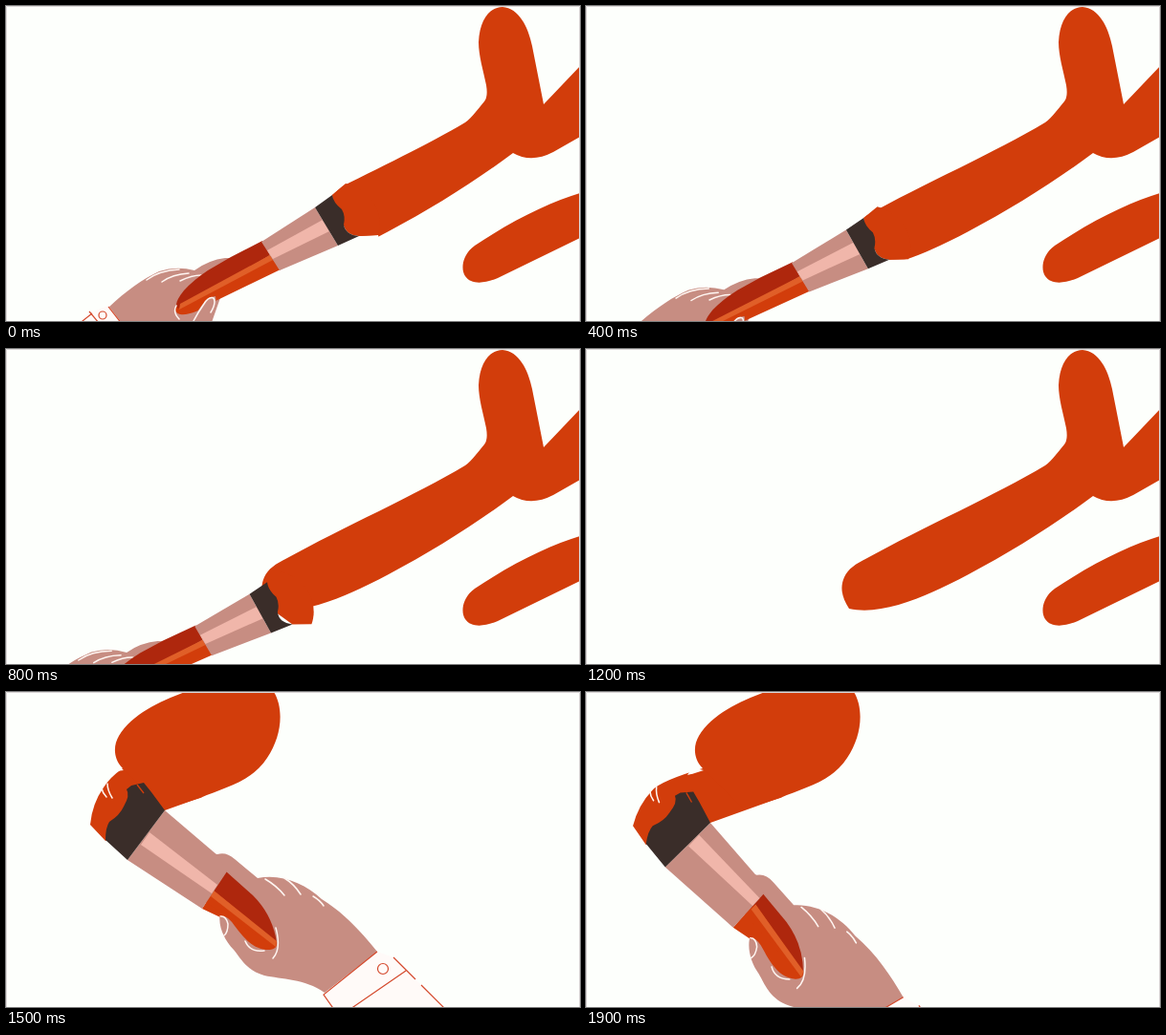
These frames come from a looping animation (600 px wide and 330 px high, 2000 ms). An HTML page:

```html
<!DOCTYPE html>
<html lang="en">
<head>
<meta charset="utf-8">
<title>Brush strokes</title>
<style>
  html, body { margin: 0; width: 100%; height: 100%; overflow: hidden; background: #fdfffc; }
  svg { display: block; width: 600px; height: 330px; }
  .paint { fill: #d23d0b; }
  .skin { fill: #c78d82; }
  .shine { fill: #f0b6aa; }
  .collar { fill: #3a2d29; }
  .shade { fill: #ae270d; }
  .stripe { fill: #e05f28; }
  .cuff { fill: #fffaf8; }
  .white { fill: none; stroke: #fff6f2; stroke-width: 1.5; stroke-linecap: round; }
  .seam { fill: none; stroke: #d4492c; stroke-width: 1.2; }
  .border { fill: none; stroke: #dcd8d8; }
</style>
</head>
<body>
<svg viewBox="0 0 600 330">
  <defs>
    <clipPath id="painted">
      <path id="wetEdge" d="M359 -200 L359 180 L355 186 L341 198 Q342 206 351 213 Q355 220 353 229 Q355 240 369 241 L389 240 L394 260 V400 H900 V-200Z"/>
    </clipPath>
  </defs>

  <g id="sweep">
    <path class="paint" d="M600 196 C570 205 530 224 490 251 C477 260 475 276 480 283 C486 292 500 291 514 285 L600 243Z"/>
    <path id="stroke" class="paint" d="M275 272 C266 258 266 248 270 239 C274 230 282 225 294 219 C350 188 430 152 480 122 C487 117 494 107 500 100 Q504 95 502 83 C499 68 494 52 494 38 C495 14 506 1 519 1 C536 2 546 22 550 42 L562 103 L600 63 V137 L572 153 Q549 165 530 154 C490 184 445 212 400 236 C360 257 312 280 275 272Z"/>
    <g id="sweepBrush">
      <path class="paint" d="M341 198 L355 186 C382 192 396 218 389 240 L369 241 L345 225Z"/>
      <path class="skin" d="M107 316 C126 298 143 286 160 278 Q178 272 197 277 Q212 266 229 264 L240 264 L226 300 L212 340 L200 370 H150Z"/>
      <path class="cuff" d="M107 314 L88 321 L50 352 L90 400 L150 370Z"/>
      <path class="seam" d="M87 320 L102 338 M90 322 L60 346 M107 315 L150 370"/>
      <circle class="seam" cx="101" cy="324" r="4"/>
      <path class="white" d="M147 287 Q160 277 181 276 M163 289 Q174 281 191 280 M182 288 Q194 282 204 282"/>
      <path class="paint" d="M276 261 L287 276 L219 309 Q194 325 182 323 Q175 321 178 314Z"/>
      <path class="shade" d="M268 246 L276 261 L180 317 Q174 313 186 298 Q196 287 211 277 L235 263Z"/>
      <path class="stripe" d="M276 261 L279 266 L181 318 L182 312Z"/>
      <path class="skin" d="M219 304 Q222 318 206 344 L192 334 Q206 308 214 305Z"/>
      <path class="white" d="M195 332 Q200 322 207 312 Q212 304 217 306 Q220 311 214 321 M178 314 Q174 321 181 328"/>
      <path class="skin" d="M267 247 L323 211 L347 251 L286 277Z"/>
      <path class="shine" d="M273 256 L331 224 L338 236 L279 265Z"/>
      <path class="collar" d="M323 211 L341 198 Q342 206 351 213 Q355 220 353 229 Q355 240 369 241 L347 251Z"/>
    </g>
  </g>

  <g id="bend">
    <path id="tail" class="paint"/>
    <path class="paint" d="M122 80 C112 70 112 56 118 46 C132 23 160 10 187 0 H280 C291 18 288 47 273 69 C257 94 229 100 203 111 L165 123Z"/>
    <g id="bendBrush">
      <path class="cuff" d="M388 272 L405 278 L457 330 L500 380 H376 L332 317Z"/>
      <path class="skin" d="M205 168 L221 170 Q230 167 239 175 L263 195 C287 190 312 200 330 217 C354 232 372 252 388 272 L333 315 C312 300 288 301 270 297 C252 292 246 280 238 270 C228 260 221 244 224 231Z"/>
      <path class="seam" d="M388 272 L332 317 L376 380 M418 292 L334 350 M405 278 L428 301 M434 307 L470 343"/>
      <circle class="seam" cx="394" cy="290" r="5.5"/>
      <path class="paint" d="M205 227 L217 208 L283 262 Q284 269 276 270 C259 271 248 257 239 245 Q230 232 224 236Z"/>
      <path class="shade" d="M230 188 L258 213 Q279 234 283 263 L217 208Z"/>
      <g id="handleGlint">
        <path class="paint" d="M217 208 L283 262 L280 266 L208 220Z"/>
        <path class="stripe" d="M217 208 L283 261 L282 267 L214 214Z"/>
      </g>
      <path class="white" d="M224 235 Q230 234 232 243 Q232 252 228 255 M250 261 Q255 273 270 271 M282 247 Q288 269 279 279 M271 196 Q283 203 291 213 M291 195 Q301 201 308 212 M321 214 Q328 218 332 224"/>
      <path class="skin" d="M166 124 L221 171 L231 188 L205 227 L127 176Z"/>
      <path id="ferruleGlint" class="shine" d="M150 147 L221 202 L215 211 L141 160Z"/>
      <path class="collar" d="M131 98 L144 95 L152 105 L166 124 L127 176 L104 155 Q104 142 108 136 Q119 129 123 120 Q130 108 126 102Z"/>
      <path class="white" d="M100 101 Q101 106 105 110 M106 96 Q106 103 111 111"/>
      <path d="M137 97 L144 106" stroke="#d23d0b" stroke-width="1.3"/>
    </g>
    <path id="notch" fill="#fdfffc"/>
  </g>
  <path class="border" d="M0.5 330 V0.5 H599.5 V330"/>
</svg>
<script>
const STEP = 100, STEPS = 20, LIFT = 6, CUT = 13;
const $ = id => document.getElementById(id);
const show = (id, on) => $(id).setAttribute("display", on ? "inline" : "none");
const place = (id, transform) => $(id).setAttribute("transform", transform);

function drawSweep(n) {
  const t = Math.min(n, LIFT), lift = Math.max(0, n - LIFT);
  const x = -14.3 * t + 0.35 * t * t + 2 * lift;
  const y = 7.04 * t - 0.27 * t * t + 3.4 * lift * lift;
  const move = `translate(${x} ${y}) rotate(${0.36 * t} 335 231)`;
  place("sweepBrush", move);
  place("wetEdge", move);
  $("stroke").setAttribute("clip-path", lift ? "none" : "url(#painted)");
  show("sweepBrush", n < 12);
}

function drawBend(n) {
  const u = n - 15;
  const dx = -7 * u - 0.5 * u * u;
  const dy = 0.75 * u + 0.625 * u * u;
  const deg = 1.175 * u + 0.2375 * u * u;
  const size = 1 + 0.011 * u - 0.0015 * u * u;
  const c = size * Math.cos(deg * Math.PI / 180), s = size * Math.sin(deg * Math.PI / 180);
  // Brush-space point to stage point
  const at = (x, y) => {
    const px = x - 166, py = y - 124;
    return `${166 + dx + px * c - py * s} ${124 + dy + px * s + py * c}`;
  };
  place("bendBrush", `translate(${166 + dx} ${124 + dy}) rotate(${deg}) scale(${size}) translate(-166 -124)`);

  // The highlights slide over the brush as it turns
  const turn = u * Math.abs(u);
  place("ferruleGlint", `translate(${0.4 * turn} ${-0.56 * turn})`);
  place("handleGlint", `rotate(${0.45 * turn} 283 262)`);

  $("tail").setAttribute("d",
    `M122 80 Q${at(109, 89)} ${at(102, 100)} Q${at(90, 117)} ${at(88, 139)}` +
    `L${at(104, 156)} L${at(140, 135)} L${at(166, 124)} L205 110 L180 70Z`);
  const w = 2 + Math.max(0, u) * 2;
  $("notch").setAttribute("d", `M${121 - w} 79 L123 82 L${118 - w / 2} ${82 + w / 3} L${116 - w} ${82 + w / 2}Z`);
}

const start = performance.now();
function frame() {
  const n = Math.floor((performance.now() - start) / STEP) % STEPS;
  show("sweep", n < CUT);
  show("bend", n >= CUT);
  if (n < CUT) drawSweep(n); else drawBend(n);
  requestAnimationFrame(frame);
}
frame();
</script>
</body>
</html>
```
